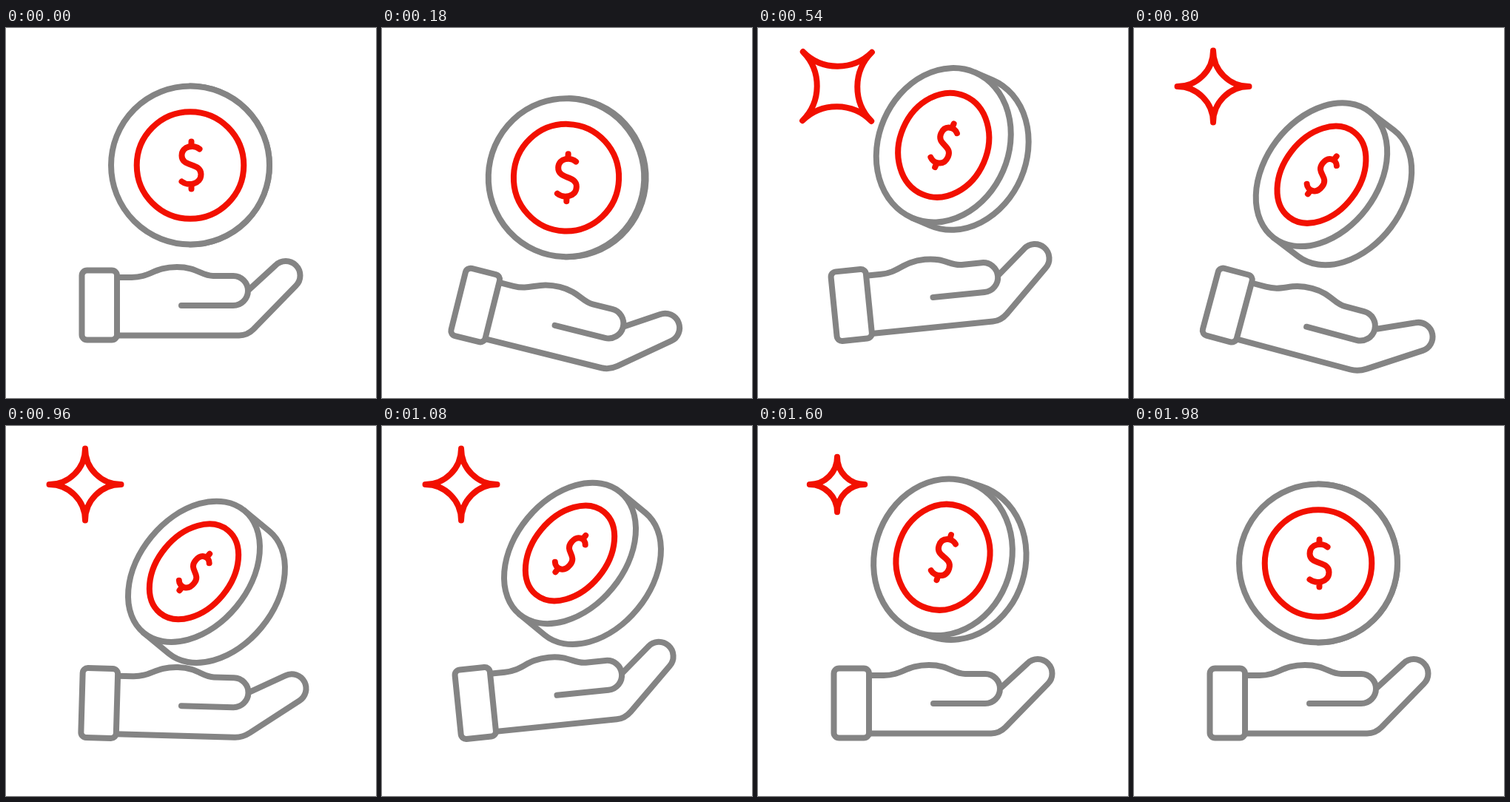
These frames come from a looping animation (500x500 px, 2 s). An HTML page with a canvas:

```html
<!DOCTYPE html>
<html lang="en">
<head>
<meta charset="utf-8">
<title>Coin toss</title>
<style>
html, body { margin: 0; width: 100%; height: 100%; overflow: hidden; background: #fff; }
canvas { display: block; }
</style>
</head>
<body>
<canvas id="stage" width="500" height="500"></canvas>
<script>
const ctx = document.getElementById('stage').getContext('2d');
const LOOP = 2000, GRAY = '#848484', RED = '#f21000';
const RAD = Math.PI / 180;
const BEATS = [0, 240, 530, 800, 1070]; // the hand dips and rises twice
const LAG = 70;                         // coin and finger follow the hand
const STAR_IN = 380, STAR_OUT = 1646, STAR_POP = 320;

const mix = (a, b, p) => a + (b - a) * p;
const span = (t, from, to) => Math.min(1, Math.max(0, (t - from) / (to - from)));
const ease = p => p * p * (3 - 2 * p);
const overshoot = p => 1 + 4.87 * (p - 1) ** 3 + 3.87 * (p - 1) ** 2;

// One pose per beat, then the last pose at the end time
function swing(poses, t, end) {
  const times = [...BEATS, end];
  return poses.reduce((value, pose, i) => i
    ? value + (pose - poses[i - 1]) * ease(span(t, times[i - 1], times[i]))
    : pose, 0);
}

// The path is transformed, the line width is not
function shape(place, trace, color, fill) {
  ctx.save();
  place();
  ctx.beginPath();
  trace();
  ctx.restore();
  if (fill) { ctx.fillStyle = '#fff'; ctx.fill(); }
  ctx.strokeStyle = color;
  ctx.stroke();
}

function drawHand(angle, bend) {
  const place = () => {
    ctx.translate(126, 374.5);
    ctx.rotate(angle * RAD);
    ctx.translate(-126, -374.5);
  };
  shape(place, () => {
    // Thumb and top of the hand
    ctx.moveTo(150, 337);
    ctx.lineTo(170, 337);
    ctx.bezierCurveTo(195, 337, 200, 323, 231, 323);
    ctx.bezierCurveTo(258, 323, 264, 335, 280, 335);
    ctx.lineTo(307, 335);
    ctx.arc(307, 355, 20, -Math.PI / 2, Math.PI / 2);
    ctx.lineTo(237, 375);
    // Finger and bottom
    const upper = mix(-45, -22, bend) * RAD, lower = mix(-45, -31, bend) * RAD;
    const knuckle = mix(326, 319, bend);
    ctx.moveTo(328, 354);
    ctx.arc(mix(378, 388, bend), mix(334.5, 352, bend), 19.5, upper - Math.PI / 2, lower + Math.PI / 2);
    ctx.lineTo(knuckle + 12 * Math.cos(lower), 415.5 + 12 * Math.sin(lower));
    ctx.quadraticCurveTo(knuckle, 415.5, knuckle - 11, 415.5);
    ctx.lineTo(150, 415.5);
  }, GRAY);
  shape(place, () => ctx.roundRect(102.5, 327.5, 47.5, 94, 7), GRAY, true);
}

function drawCoin(y, tilt) {
  const squash = 1 - .305 * tilt, depth = 44 * tilt, R = 107;
  const turn = () => {
    ctx.translate(249 + 5 * tilt * tilt, y);
    ctx.rotate(39.5 * tilt * RAD);
  };
  const face = () => { turn(); ctx.scale(squash, 1); };
  const ring = r => () => ctx.arc(0, 0, r, 0, 2 * Math.PI);

  shape(turn, () => {
    ctx.moveTo(0, -R);
    ctx.ellipse(depth, 0, R * squash, R, 0, -Math.PI / 2, Math.PI / 2);
    ctx.lineTo(0, R);
  }, GRAY, true);
  shape(face, ring(R), GRAY, true);
  shape(face, ring(72.3), RED);
  shape(face, () => {
    ctx.moveTo(12.5, -22);
    ctx.bezierCurveTo(6, -28, -11.5, -27, -11.5, -13);
    ctx.bezierCurveTo(-11.5, 3, 14.5, -4, 14.5, 12);
    ctx.bezierCurveTo(14.5, 27, -4, 28, -11.5, 22);
    for (const side of [-1, 1]) {
      ctx.moveTo(1.5, 32 * side);
      ctx.lineTo(1.5, 25.5 * side);
    }
  }, RED);
}

function drawStar(t) {
  const enter = span(t, STAR_IN, STAR_IN + STAR_POP);
  const leave = span(t, STAR_OUT, STAR_OUT - STAR_POP);
  const r = 48.5 * overshoot(Math.min(enter, leave));
  if (r < 1) return;
  shape(() => {
    ctx.translate(107, 79);
    ctx.rotate(90 * ease(enter) * RAD);
  }, () => {
    for (let i = 0; i < 4; i++) {
      ctx.arc(r, -r, r, Math.PI, Math.PI / 2, true);
      ctx.rotate(Math.PI / 2);
    }
    ctx.closePath();
  }, RED);
}

function draw() {
  const t = performance.now() % LOOP, late = t - LAG;
  ctx.fillStyle = '#fff';
  ctx.fillRect(0, 0, 500, 500);
  ctx.lineWidth = 8;
  ctx.lineCap = ctx.lineJoin = 'round';
  drawHand(swing([0, 16.5, -5.8, 15, -5.8, 0], t, 1400),
    swing([0, 1, 0, 1, 0, 0], late, 1400));
  drawCoin(swing([185.5, 223, 150.5, 207.5, 167, 185.5], late, LOOP - LAG),
    swing([0, .12, .65, 1, 1, 0], late, LOOP - LAG));
  drawStar(t);
  requestAnimationFrame(draw);
}
draw();
</script>
</body>
</html>
```
